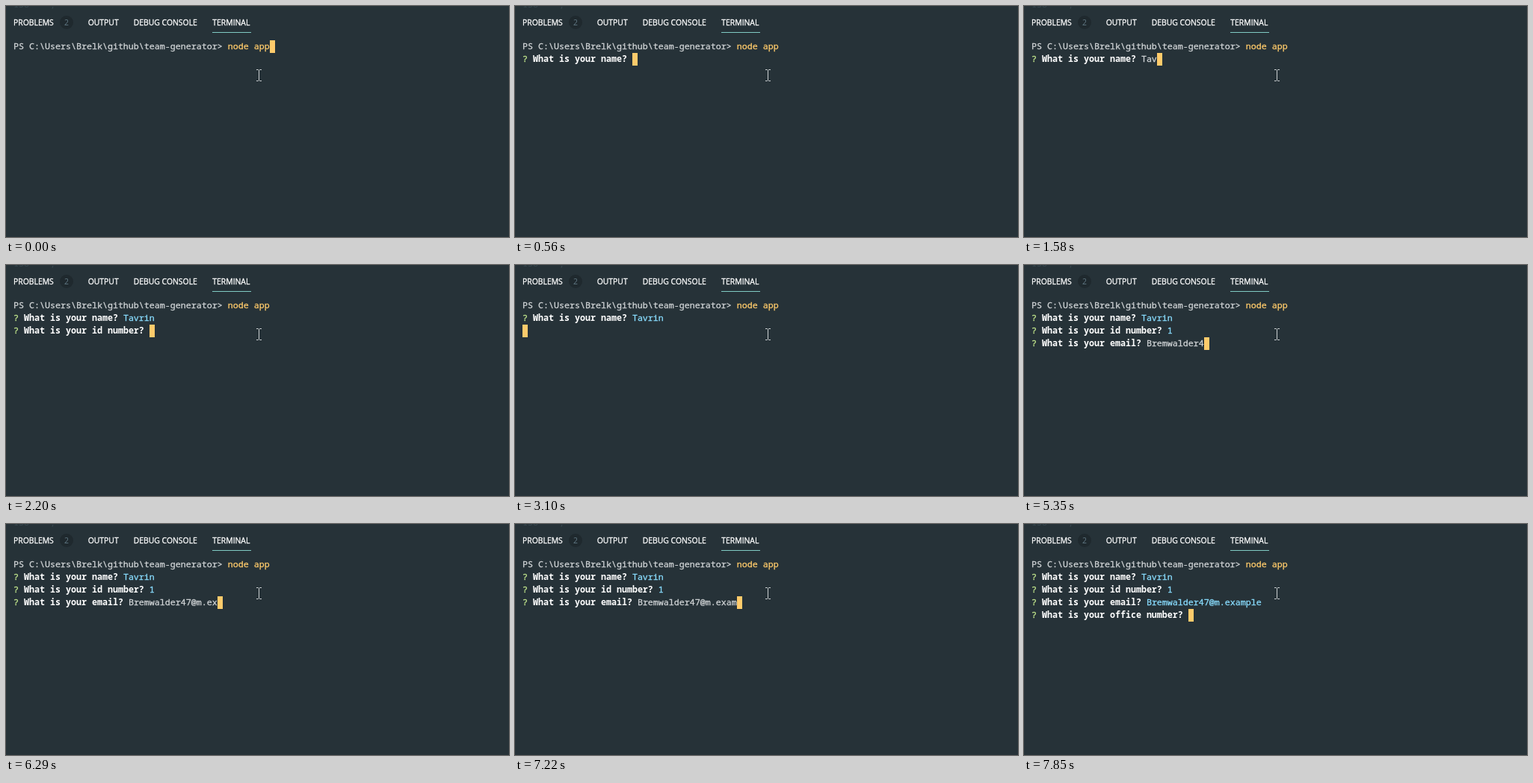
These frames come from a looping animation (673x310 px, 8000 ms). An HTML page:

```html
<!DOCTYPE html>
<html lang="en">
<head>
<meta charset="utf-8">
<title>Terminal prompt</title>
<style>
  html, body { margin: 0; width: 100%; height: 100%; overflow: hidden; background: #263238; }
  svg { display: block; }
  text { white-space: pre; fill: currentColor; stroke: currentColor; stroke-width: .3px; }
  .tabs { font: 10.4px "Open Sans", "Noto Sans", sans-serif; color: #fff; }
  .term { font: 11.6667px "Noto Sans Mono", "Liberation Mono", monospace; color: #d0d4d6; }
  .badge { color: #607883; stroke: none; }
  .gutter { color: #37474f; stroke: none; }
  .command { color: #ffcb6b; }
  .mark { color: #c3e88d; }
  .question { color: #fff; font-weight: 700; stroke: none; }
  .done { color: #89ddff; }
</style>
</head>
<body>
<svg width="673" height="310" viewBox="0 0 673 310">
  <rect width="673" height="310" fill="#263238"/>
  <g class="tabs">
    <text x="10" y="26">PROBLEMS</text>
    <circle cx="81" cy="22" r="9" fill="#1f292e"/>
    <text class="badge" x="81" y="26" text-anchor="middle">2</text>
    <text x="109.7" y="26">OUTPUT</text>
    <text x="170.7" y="26">DEBUG CONSOLE</text>
    <text x="276.3" y="26">TERMINAL</text>
    <rect x="276" y="35" width="52" height="1" fill="#80cbc4"/>
  </g>
  <g class="term" id="term">
    <text class="gutter" x="10" y="2">138    ,</text>
  </g>
  <rect id="caret" width="7" height="17" fill="#ffcb6b"/>
  <path d="M335 85.5h2.5l1 1l1-1h2.5M338.5 86v14M335 100.5h2.5l1-1l1 1h2.5" fill="none" stroke="#cbd0d2"/>
</svg>
<script>
const LOOP = 8000, KEY = 112, REDRAW = 120;
const LEFT = 10, TOP = 46, CELL = 7, LINE = 17;
const PROMPT = "PS C:\\Users\\Brelk\\github\\team-generator> ";
const COMMAND = "node app";

// Times in ms: the caret arrives at "enter", the question at "open",
// each burst types its keys at a steady pace, "redraw" briefly clears the line.
const FIELDS = [
  { question: "What is your name?", enter: 250, open: 560, redraw: 1460,
    bursts: [[1310, "T"], [1460, "av"], [1750, "rin"]] },
  { question: "What is your id number?", enter: 2200, open: 2200, redraw: 3100,
    bursts: [[3100, "1"]] },
  { question: "What is your email?", enter: 3220, open: 3220, redraw: 7460,
    bursts: [[4060, "Bremwalder"], [5350, "47@"], [5950, "m.ex"], [7100, "ample"]] },
  { question: "What is your office number?", enter: 7850, open: 7850, bursts: [] }
];

const term = document.getElementById("term");
const caret = document.getElementById("caret");

function addNode(parent, tag, attrs, content = "") {
  const node = document.createElementNS("http://www.w3.org/2000/svg", tag);
  for (const key in attrs) node.setAttribute(key, attrs[key]);
  node.textContent = content;
  return parent.appendChild(node);
}

function addRow(row) {
  return addNode(term, "text", { x: LEFT, y: TOP + row * LINE + 12 });
}

const promptRow = addRow(0);
addNode(promptRow, "tspan", {}, PROMPT);
addNode(promptRow, "tspan", { class: "command" }, COMMAND);

for (const [i, field] of FIELDS.entries()) {
  field.row = addRow(i + 1);
  addNode(field.row, "tspan", { class: "mark" }, "? ");
  addNode(field.row, "tspan", { class: "question" }, field.question);
  field.answer = addNode(field.row, "tspan", {});
}

function typedText(bursts, time) {
  return bursts.map(([start, keys]) =>
    keys.slice(0, Math.max(0, Math.floor((time - start) / KEY) + 1))).join("");
}

function render(time) {
  const active = FIELDS.findLastIndex(field => field.enter <= time);
  let column = active < 0 ? PROMPT.length + COMMAND.length : 0;

  FIELDS.forEach((field, i) => {
    const cleared = time >= field.redraw && time < field.redraw + REDRAW;
    const shown = time >= field.open && !cleared;
    const text = typedText(field.bursts, time);
    field.row.setAttribute("visibility", shown ? "visible" : "hidden");
    field.answer.setAttribute("class", i < active ? "done" : "");
    field.answer.textContent = " " + text;
    if (i === active && shown) column = field.question.length + 3 + text.length;
  });

  caret.setAttribute("x", LEFT + column * CELL);
  caret.setAttribute("y", TOP + (active + 1) * LINE);
}

const start = performance.now();
function frame(now) {
  render(Math.max(0, now - start) % LOOP);
  requestAnimationFrame(frame);
}
render(0);
requestAnimationFrame(frame);
</script>
</body>
</html>
```
